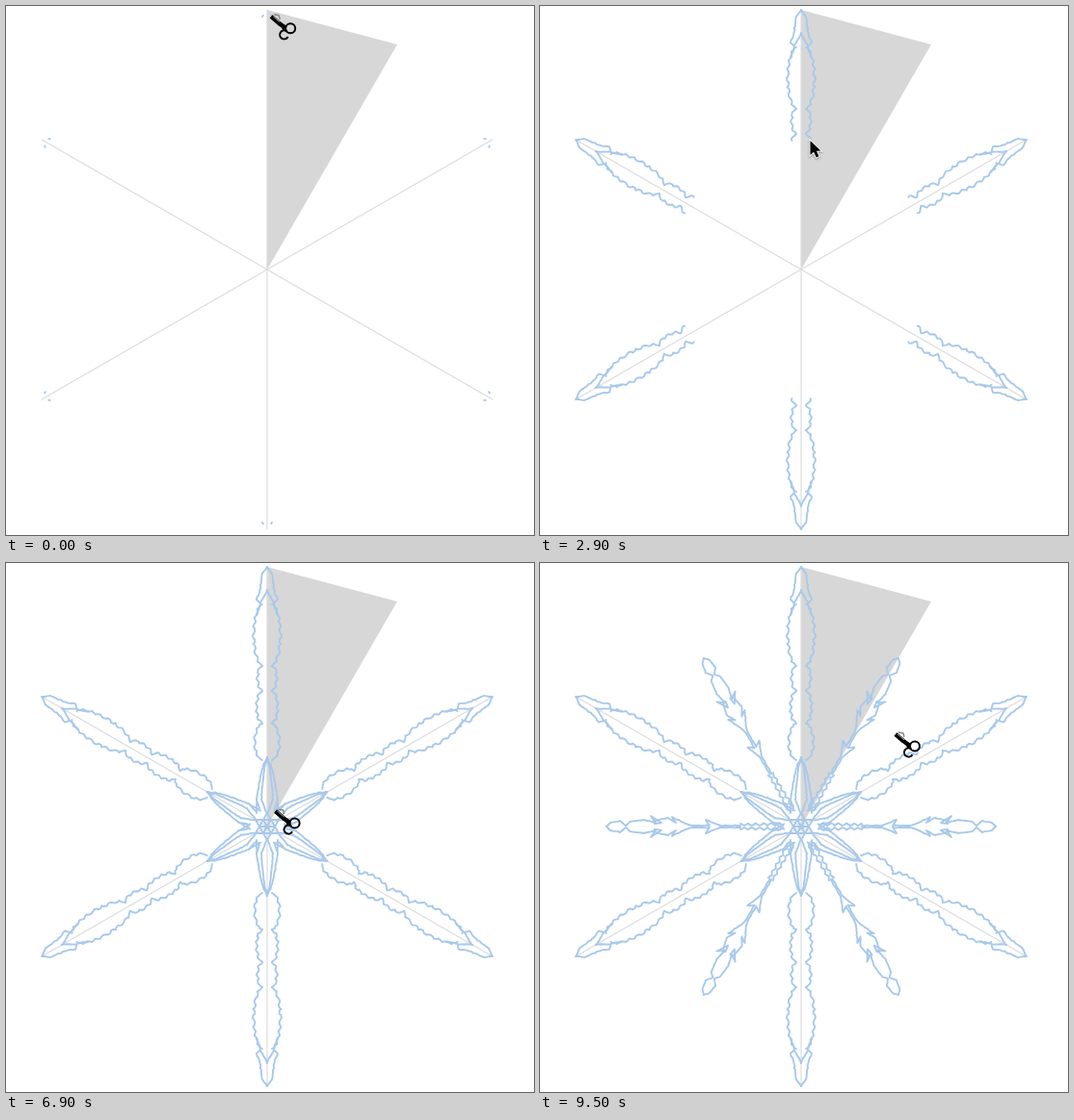
An HTML page with a canvas that plays this animation: 548x550 px, repeating every 9.6 s.

```html
<!DOCTYPE html>
<html lang="en">
<head>
<meta charset="utf-8">
<title>Paper snowflake</title>
<style>
  html, body { margin: 0; width: 100%; height: 100%; overflow: hidden; background: #fff; }
  canvas { display: block; }
</style>
</head>
<body>
<canvas id="stage" width="548" height="550"></canvas>
<script>
const ctx = document.getElementById('stage').getContext('2d');
const LOOP = 9600, CX = 271, CY = 274, R = 270;
const RAD = Math.PI / 180;

let seed = 7;
const rand = () => (seed = (seed * 16807) % 2147483647) / 2147483647;
const clamp = x => Math.max(0, Math.min(1, x));
const mix = (a, b, f) => a.map((x, i) => x + (b[i] - x) * f);

const cuts = [];
let axis = 0;

// Adds a cut along corners [radius, offset from axis], roughened in short steps.
function cut(from, to, rough, ...corners) {
  const pts = [corners[0]];
  corners.slice(1).forEach((c, i) => {
    const n = Math.ceil(Math.hypot(c[0] - corners[i][0], c[1] - corners[i][1]) / 3);
    for (let k = 1; k <= n; k++) {
      const j = k < n ? rough * 2.4 : 0;
      pts.push(mix(corners[i], c, k / n).map(x => x + (rand() - .5) * j));
    }
  });
  cuts.push({ axis, from, to, pts });
}

// Corners from one radius to another, with the offset given by width(fraction, index).
function profile(a, b, step, width) {
  const n = Math.round(Math.abs(b - a) / step);
  return Array.from({ length: n + 1 }, (_, i) => [a + (b - a) * i / n, width(i / n, i)]);
}

const lobe = (from, to, a, b, h) => cut(from, to, .8, ...profile(a, b, 4.5, (f, i) =>
  5 + h * Math.sqrt(Math.max(0, Math.sin(Math.PI * f))) + (f % 1 ? (i % 2 ? 1 : -1.2) : 0)));
const petal = (from, to, h) => cut(from, to, .3, ...profile(72, 28, 7, f => h * f ** .6));

cut(-60, 250, .3, [263, 5], [270, 0]);
cut(300, 700, .6, [263, 5], [256, 6], [243, 8], [236, 11], [233, 8]);
cut(700, 1150, .6, [221, 11], [236, 5], [246, 0]);
lobe(1200, 2200, 231, 167, 9);
lobe(2200, 2700, 167, 141, 5);
lobe(2700, 3500, 141, 107, 6);
lobe(3500, 4400, 107, 69, 8);
petal(4500, 4900, 11);
petal(4950, 5350, 6);
cut(5500, 5800, .3, [14, 11], [28, 11], [19, 8]);
cut(5800, 6100, .3, [28, 6], [15, 1]);
cut(6150, 6400, 0, [14, 0], [7, 4], [7, 0]);
cut(6400, 6850, 0, [0, 0], [7, 4]);
axis = 30;
cut(6900, 7500, .3, ...profile(19, 63, 4, (f, i) => i % 2 ? 4 - f : 1));
cut(7500, 8100, .3, [63, 1], [84, 1], [99, 7], [95, 1], [112, 1]);
cut(8100, 8800, .3, [112, 1], [120, 3], [134, 10], [130, 4], [139, 9], [151, 6], [152, 3]);
cut(8800, 9300, .3, [152, 3], [145, 4], [156, 11], [151, 4], [163, 7], [178, 5],
  [182, 1], [188, 6], [198, 4], [202, 0]);

// The part of a cut made by time t.
function made({ from, to, pts }, t) {
  const pos = clamp((t - from) / (to - from)) * (pts.length - 1);
  const i = Math.floor(pos), part = pts.slice(0, i + 1);
  if (i < pts.length - 1) part.push(mix(pts[i], pts[i + 1], pos - i));
  return part;
}

function onStage(c, [u, v]) {
  const a = c.axis * RAD, w = c.axis ? -v : v;
  return [CX + u * Math.sin(a) + w * Math.cos(a), CY - u * Math.cos(a) + w * Math.sin(a)];
}

function pointer(t) {
  let last = cuts[0];
  for (const c of cuts) {
    if (t < c.from) {
      const f = clamp((t - last.to) / (c.from - last.to) * 1.5);
      return mix(onStage(last, last.pts.at(-1)), onStage(c, c.pts[0]), f);
    }
    if (t <= c.to) return onStage(c, made(c, t).at(-1));
    last = c;
  }
  return mix(onStage(last, last.pts.at(-1)), [369, 177], clamp((t - last.to) / 200));
}

function line(...pts) {
  ctx.beginPath();
  pts.forEach(p => ctx.lineTo(p[0], p[1]));
}

function paper() {
  ctx.fillStyle = '#d7d7d7';
  line([CX, 4], [406, 40], [CX, CY]);
  ctx.fill();
  ctx.strokeStyle = '#dcdcdc';
  ctx.lineWidth = 1.2;
  for (let k = 0; k < 6; k++) {
    const a = k * 60 * RAD;
    line([CX, CY], [CX + R * Math.sin(a), CY - R * Math.cos(a)]);
    ctx.stroke();
  }
}

function flake(t) {
  ctx.strokeStyle = '#a8c9ea';
  ctx.lineWidth = 1.9;
  ctx.lineCap = ctx.lineJoin = 'round';
  for (const c of cuts) {
    if (t < c.from) continue;
    const part = made(c, t);
    for (let k = 0; k < 12; k++) {
      ctx.save();
      ctx.translate(CX, CY);
      ctx.rotate((c.axis + (k >> 1) * 60) * RAD);
      ctx.scale(k % 2 ? -1 : 1, 1);
      line(...part.map(([u, v]) => [v, -u]));
      ctx.stroke();
      ctx.restore();
    }
  }
}

function arrow() {
  line([0, 0], [0, 15], [3.6, 11.8], [6.2, 17.5], [9, 16.3], [6.5, 10.8], [11, 10.6]);
  ctx.closePath();
  ctx.lineJoin = 'miter';
  ctx.strokeStyle = '#fff';
  ctx.lineWidth = 2;
  ctx.shadowColor = 'rgba(0,0,0,.4)';
  ctx.shadowBlur = 2;
  ctx.shadowOffsetY = 1;
  ctx.stroke();
  ctx.shadowColor = 'transparent';
  ctx.fillStyle = '#000';
  ctx.fill();
}

function scissors() {
  const bar = (color, width, ...pts) => {
    ctx.strokeStyle = color;
    ctx.lineWidth = width;
    line(...pts);
    ctx.stroke();
  };
  const ring = (x, y, r, a, b) => {
    ctx.beginPath();
    ctx.arc(x, y, r, a, b);
    ctx.stroke();
  };
  ctx.lineCap = 'butt';
  bar('#888', 1.5, [3, -1], [8, 0], [9, 4]);
  bar('#000', 4.5, [0, 1], [8, 8], [15, 13]);
  bar('#ccc', .8, [2, 1], [9, 7]);
  bar('#000', 2, [11, 10], [13, 15]);
  ring(20, 13.5, 5, 0, 7);
  ring(13.5, 20, 4.5, .5, 5.4);
}

function draw(now) {
  const t = Math.floor(now % LOOP / 100) * 100;
  ctx.fillStyle = '#fff';
  ctx.fillRect(0, 0, 548, 550);
  paper();
  flake(t);
  ctx.save();
  ctx.translate(...pointer(t));
  (t >= 1000 && t < 5000 ? arrow : scissors)();
  ctx.restore();
}

const start = performance.now();
function tick() {
  draw(performance.now() - start);
  requestAnimationFrame(tick);
}
tick();
</script>
</body>
</html>
```
